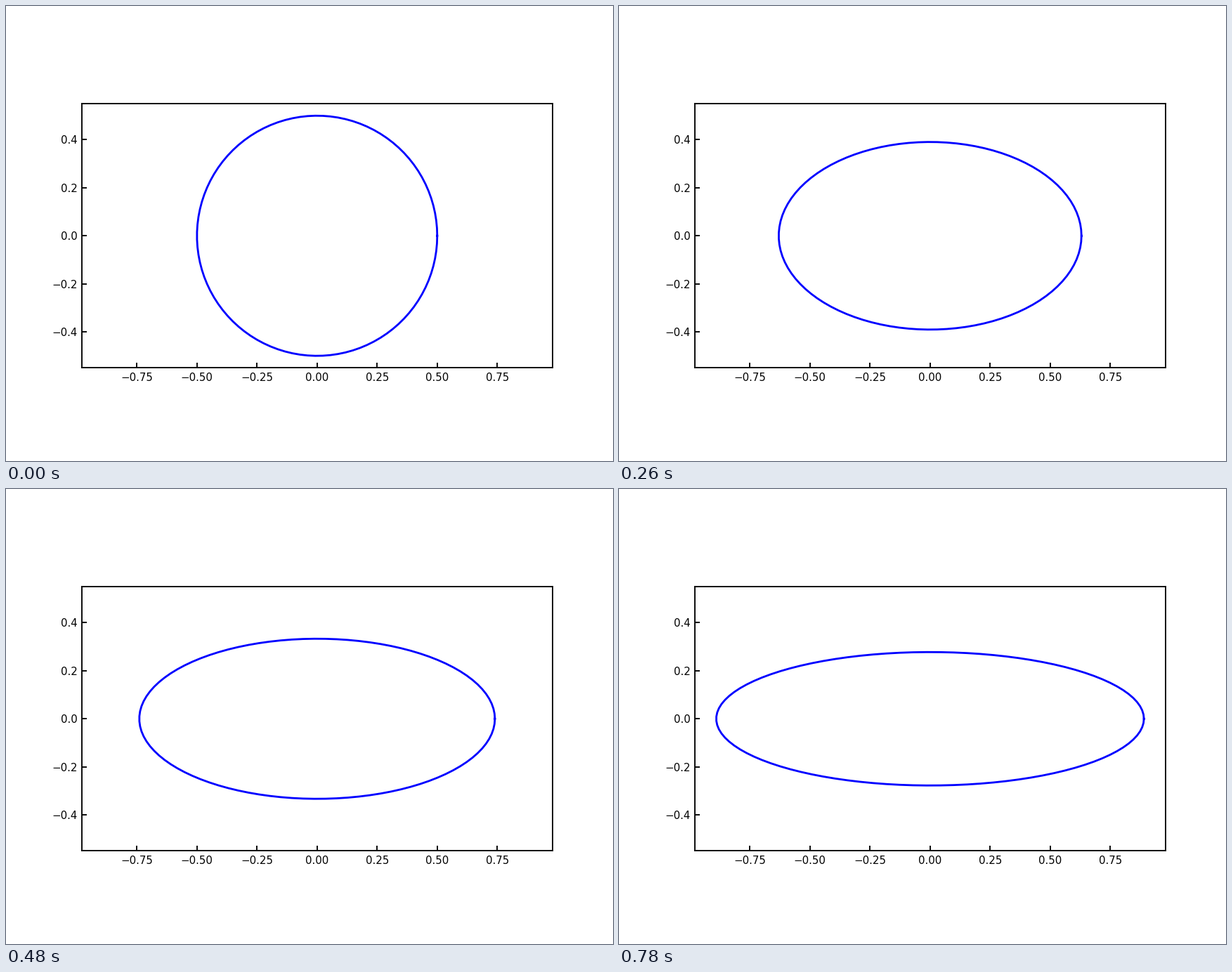
A matplotlib script that plays this animation: 864 by 648 pixels, repeating every 800 ms.

```python
import numpy as np
import matplotlib.pyplot as plt
from matplotlib.animation import FuncAnimation

FRAMES = 40
INTERVAL = 20
STEP = 0.01
AREA = 0.25  # product of the half-axes

plt.rcParams.update({
    "font.family": "DejaVu Sans",
    "font.size": 8,
    "axes.linewidth": 1.0,
})

theta = np.linspace(0, 2 * np.pi, 100)


def half_axes(i):
    """Width grows evenly; height runs one step ahead after the start."""
    a = 0.5 + STEP * i
    b = AREA / (a + STEP) if i else 0.5
    return a, b


fig, ax = plt.subplots(figsize=(6.4, 4.8), dpi=135, facecolor="white")
ax.set_aspect("equal")
ax.set_xlim(-0.979, 0.979)
ax.set_ylim(-0.55, 0.55)
ax.set_xticks(np.arange(-3, 4) * 0.25)
ax.set_yticks(np.arange(-2, 3) * 0.2)
ax.tick_params(direction="in", length=3.5, width=1.0, pad=3.5)

line, = ax.plot([], [], color="blue", lw=1.5)


def draw(i):
    a, b = half_axes(i)
    line.set_data(a * np.cos(theta), b * np.sin(theta))
    return line,


anim = FuncAnimation(fig, draw, frames=FRAMES, interval=INTERVAL,
                     repeat=True, repeat_delay=0)
plt.show()
```
